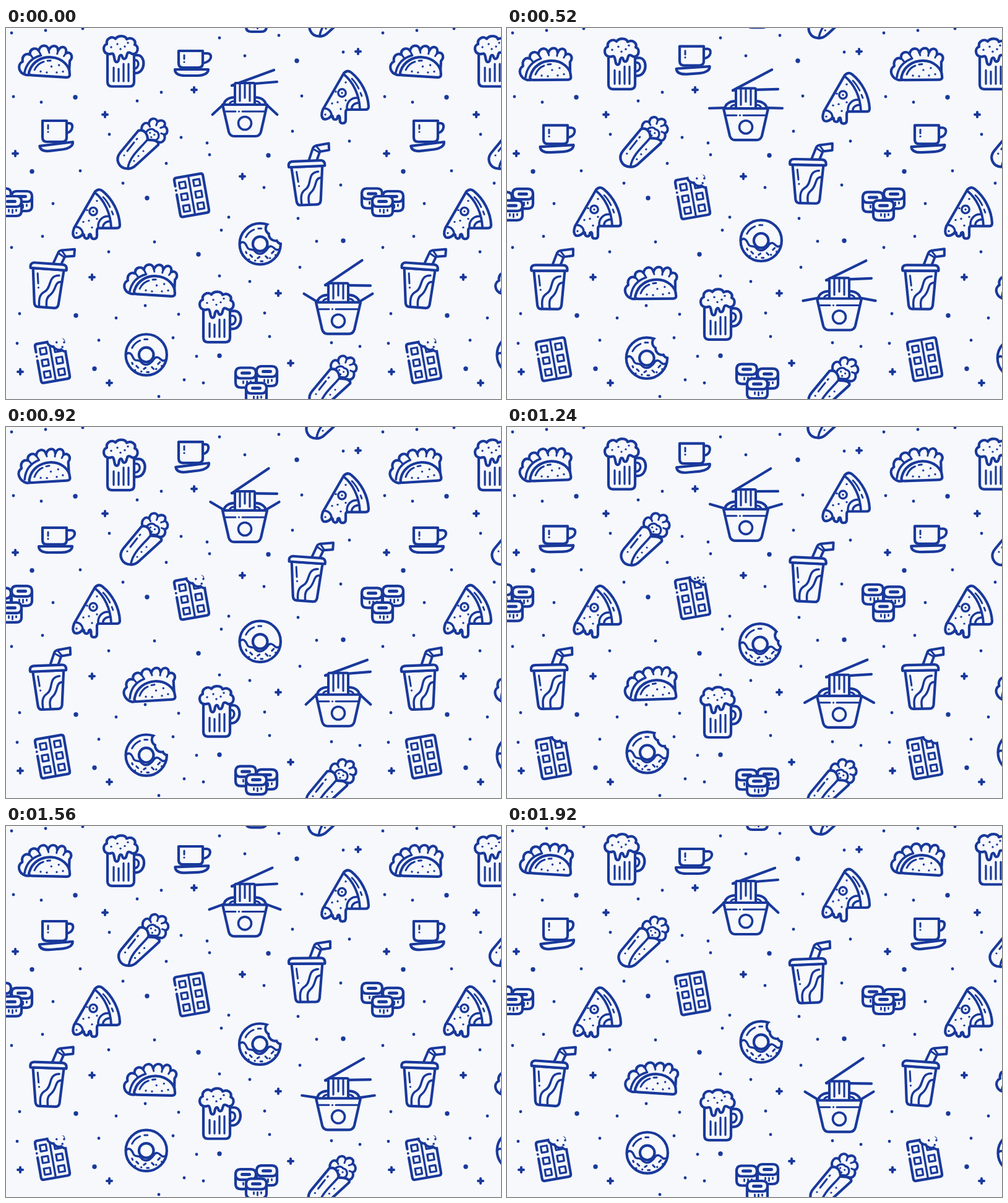
These frames come from a looping animation (800x600 px, 1960 ms). An HTML page with a canvas:

```html
<!DOCTYPE html>
<html lang="en">
<head>
<meta charset="utf-8">
<title>Snack pattern</title>
<style>
  html, body { margin: 0; width: 100%; height: 100%; overflow: hidden; background: #f6f8fc; }
  canvas { display: block; width: 800px; height: 600px; }
</style>
</head>
<body>
<canvas id="stage" width="800" height="600"></canvas>
<script>
const INK = '#19399b', PAPER = '#f6f8fc';
const TILE = 600, STEP = 40, STEPS = 48;
const ctx = document.getElementById('stage').getContext('2d');

// ---------- drawing helpers ----------
function line(d, w = 3) {
  ctx.lineWidth = w;
  ctx.stroke(new Path2D(d));
}
function shape(d, w = 4.2) {
  const path = new Path2D(d);
  ctx.fillStyle = PAPER;
  ctx.fill(path);
  ctx.lineWidth = w;
  ctx.stroke(path);
}
function disc(x, y, r, color = INK) {
  ctx.fillStyle = color;
  ctx.beginPath();
  ctx.arc(x, y, r, 0, 7);
  ctx.fill();
}
function dots(r, xy) {
  for (let i = 0; i < xy.length; i += 2) disc(xy[i], xy[i + 1], r);
}
function ring(x, y, r, w = 4) {
  ctx.lineWidth = w;
  ctx.beginPath();
  ctx.arc(x, y, r, 0, 7);
  ctx.stroke();
}
function at(x, y, draw) {
  ctx.save();
  ctx.translate(x, y);
  draw();
  ctx.restore();
}
function turn(deg, x, y) {
  ctx.translate(x, y);
  ctx.rotate(deg * Math.PI / 180);
  ctx.translate(-x, -y);
}
// Cuts round bites with an inked edge, kept inside the silhouette.
function bite(outline, holes) {
  ctx.save();
  ctx.clip(outline);
  for (const [x, y, r] of holes) ring(x, y, r, 8);
  ctx.restore();
  for (const [x, y, r] of holes) disc(x, y, r, PAPER);
}
const wave = p => Math.sin(2 * Math.PI * p);
const ease = p => (1 - Math.cos(2 * Math.PI * p)) / 2;

// ---------- food ----------
function taco(p) {
  const e = ease(p);
  ctx.translate(0, 10.5 * e);
  turn(3.5 - 7 * e, 68, 70);
  at(0, -3 * e, () => {
    shape(`M38 ${78 + 3 * e}H33C20 76 17 62 26 57C24 48 30 42 37 45C36 34 47 32 51 38C52 27 65 26 67 36
      C70 26 82 26 82 36C86 26 97 28 95 39C103 35 108 44 102 51V70`);
    line('M38 45L42 50M51 38L54 43M67 36L68 40M82 36L81 41M95 39L92 44', 3);
    line('M30 75C32 60 40 50 55 45', 3.6);
  });
  shape('M42 78C38 78 36 76 38 71C42 56 56 47 72 47C90 47 103 60 103 72C104 76 102 78 98 78Z');
  line('M46 69C49 62 54 57 60 55M66 53L71 52.5', 3);
  dots(1.7, [66, 72, 82, 71, 92, 69, 85, 59, 56, 71, 73, 62]);
}

function beer(p) {
  const e = ease(p);
  ctx.translate(0, 7.6 * e);
  at(2.2 * e, 0, () => {
    shape('M206 44H211C227 43 226 73 209 73H206');
    line('M206 52C216 49 217 66 206 66', 3.6);
  });
  shape('M164 40V87Q164 94.5 171 94.5H200Q207 94.5 207 87V40');
  line('M174 64V86M182 66V86M190 58V86M198 58V86', 3.2);
  shape(`M165 42C156 40 156 28 163 26C161 17 172 12 177 17.5C181 11.5 193 11.5 195 18
    C203 14 211 20 208 27C215 29 214 41 206 42C203 43 201 38 197 40C194 43 196 50 191 50
    C187 50 189 43 185 44C181 45 184 55 179 55C174 55 176 45 173 42C171 40 169 43 165 42Z`);
  dots(1.7, [180, 26, 192, 30, 185, 34, 197, 24, 170, 31]);
}

function cup(p) {
  const e = ease(p), top = 37 - 13 * e, base = 64 - 6 * e;
  shape(`M318 ${top + 4}H${326 - 3 * e}Q${332 - 4 * e} ${top + 5} ${331 - 4 * e} ${top + 11}
    Q${329 - 3 * e} ${top + 18} 318 ${top + 20}`, 4);
  shape(`M279 ${top}H318V${base - 7}Q318 ${base} 311 ${base}H286Q279 ${base} 279 ${base - 7}Z`);
  line(`M288 ${top + 7}V${top + 13}`, 3);
  dots(1.6, [288, top + 18]);
  at(1.5 * e, -5.5 * e, () => {
    turn(-7 * e, 300, 70);
    shape('M273 67H327C327 74 318 77 310 77H290C280 77 273 74 273 67Z');
  });
}

function noodles(p) {
  const e = ease(p), y = 11 * e, grip = 93 + 14 * e, top = 89 + 15 * e;
  line(`M365 ${grip}L438 ${87 + 21 * e}`, 4.2);
  line(`M365 ${grip}L${433 - 8.5 * e} ${68 - e}`, 4.2);
  at(0, y, () => {
    shape('M352 124C353 116 361 112 371 112H401C411 112 419 116 420 124');
    line('M361 123Q363 118 370 118M411 123Q409 118 402 118', 3.2);
  });
  shape(`M370 ${123 + y}V${top + 2}Q370 ${top} 372 ${top}H400Q402 ${top} 402 ${top + 2}V${123 + y}`, 4);
  line(`M378 ${top}V${118 + y}M386 ${top}V${113 + y}M394 ${top}V${118 + y}`, 3.2);
  const a = (43 - 74 * e) * Math.PI / 180, fx = 25 * Math.cos(a), fy = 25 * Math.sin(a);
  at(0, y, () => {
    line(`M352 123L${352 - fx} ${123 + fy}M420 123L${420 + fx} ${123 + fy}`, 4.2);
    shape('M350 124H422L412 168Q410 175 403 175H369Q362 175 360 168Z');
    line('M355 135H371M382 135H418', 3);
    dots(1.6, [376.5, 135]);
    ring(386, 154, 10.5, 3.6);
  });
}

function pizza(p) {
  const e = ease(p), drip = 154 - 4.5 * e;
  ctx.translate(0, 5.6 * e);
  shape(`M546 73Q552 67 558 72C574 85 585 106 586 127Q586 132 581 132H552Q549 132 549 136V${drip - 5}
    Q549 ${drip} 544 ${drip}Q539.5 ${drip} 539.5 ${drip - 5}V145Q539 140 536 143
    Q536 ${148 + e} 532 ${148 + e}Q528 148 528 143Q526 140 524 144Q518 149 513 147Q508 143 512 132Z`);
  line('M546 75C561 87 571 108 572 131', 3.8);
  line('M559 82C564 87 567 92 570 98M573 105L575 110', 2.8);
  ring(543, 105, 6.2, 3.4);
  line('M514 130C522 130 527 136 526 144M551 131C550 120 558 112 568 113M559 131C558 126 563 121 570 121', 3.5);
  disc(543, 105, 1.7);
  dots(1.7, [549, 88, 533, 103, 536, 120, 527, 122, 549, 117, 541, 131, 516, 140]);
}

function burrito(p) {
  const e = ease(p), a = 2 * Math.PI * (p + 0.1);
  ctx.translate(5 * e, -5 * e);
  at(-2.3 + 2.5 * Math.cos(a), -1.7 + 2 * Math.sin(a), () => {
    shape(`M220 168C217 157 226 151 231 156C232 145 243 145 245 152C253 147 260 153 256 159
      C263 163 262 172 256 173C259 181 253 187 247 185L230 182Z`, 4);
    line('M231 156L233 160M245 152L243 158M256 160L250 162M256 173L251 171', 3);
    shape('M226 174C226 164 237 161 241 167C249 168 249 180 242 182L230 181Z', 3.4);
    dots(1.6, [233, 170, 240, 173, 235, 177]);
  });
  shape(`M214 166L185 201C175 213 183 227 196 227.5C202 228 207 225 211 221L246 189
    C248 184 241 181 229 181C229 172 224 163 214 166Z`);
  line('M229 180C218 194 200 207 197 226', 3.6);
  line('M196 199L207 185M211 180L212 179', 3);
  dots(1.6, [191, 206, 214, 207, 222, 199, 207, 215]);
}

function soda(p) {
  const e = ease(p);
  ctx.translate(e, -4.5 * e);
  turn(-2.5 + 6.5 * e, 486, 219);
  at(3 * e, e, () => {
    shape('M489 216L497 195Q498 192 502 191L523 188V199L508 201L502 216', 4);
    line('M497 196L507 202M502 191L509 200', 3);
  });
  shape('M461 224L467 280Q468 286 473 286H500Q505 286 506 280L511 224Z');
  line('M504 233C485 234 494 254 482 261C474 266 474 274 475 284', 3.5);
  line('M508 243C496 244 502 257 491 266C486 270 486 276 487 284', 3.5);
  line('M469 232L471 248', 3);
  dots(1.6, [472, 255]);
  shape('M457 224Q455 215 464 215H508Q516 215 515 224Z');
}

const SLAB = new Path2D();
SLAB.roundRect(-25.6, -34.1, 51.2, 68.2, 6);

function waffle(p) {
  const u = p * STEP * STEPS;
  ctx.translate(300, 270.5 + 6 * ease(p));
  turn(-10, 0, 0);
  line('M-23.5 -19V-28Q-23.5 -32 -19.5 -32H19.5Q23.5 -32 23.5 -28V28Q23.5 32 19.5 32H-19.5Q-23.5 32 -23.5 28V-5', 4.2);
  dots(2, [-23.5, -12]);
  line('M0 -29V29', 3.4);
  for (const x of [-11.7, 11.7])
    for (const y of [-18.8, 0.3, 19.4]) line(`M${x - 5} ${y - 5}h10v10h-10z`, 3.2);
  if (u >= 200 && u < 480) bite(SLAB, [[13, -34, 8], [23, -28, 7]]);
  if (u >= 480 && u < 1200) {
    bite(SLAB, [[7, -33, 8], [16, -27, 9], [25, -21, 7]]);
    dots(1.8, [12, -29, 20, -20, 24, -27]);
  }
  if (u >= 1200 && u < 1400) {
    bite(SLAB, [[11, -33, 8], [22, -27, 8]]);
    dots(1.8, [9, -29, 14, -30, 16, -25, 21, -22, 23, -28]);
  }
}

const ROUND = new Path2D();
ROUND.arc(0, 0, 35.3, 0, 7);

function donut(p) {
  const u = p * STEP * STEPS;
  const kick = u > 1120 && u < 1720 ? -2 * (1 - (u - 1120) / 600) : 0;
  ctx.translate(410.7 + kick, 348.3 - 4.5 * wave(p - 0.03));
  ring(0, 0, 33.2, 4.2);
  line('M-32 -1C-27 -6 -23 0 -21 5C-18 12 -13 7 -9 11C-4 18 3 17 8 12C13 9 12 3 18 4C24 5 24 13 32 8', 3.5);
  ctx.fillStyle = PAPER;
  disc(0, 0, 11.5, PAPER);
  ring(0, 0, 11.8, 4.2);
  line('M-23 -11C-20 -17 -15 -21 -10 -23M-3 -25L2 -25', 3);
  line('M-16 18L-13 21M-4 23L-1 21M9 20L12 23M19 15L22 12M1 28L4 28M-23 13L-22 15', 3);
  dots(1.7, [-8, 27, 16, 23, 25, 18, -18, 25]);
  if (u < 240 || u >= 1400) bite(ROUND, [[19, -25, 8], [25, -16, 9], [35, -9, 7]]);
  else if (u < 440) bite(ROUND, [[20, -28, 7], [27, -20, 8], [36, -12, 6]]);
  else if (u >= 1120) bite(ROUND, [[34, -14, 8], [37, -3, 6]]);
}

function roll(x, y) {
  at(x, y + 2, () => {
    shape('M-16.5 8V24Q-16.5 32 -8 32H8Q16.5 32 16.5 24V8Z');
    line('M-4 22V25M2 22V27M8 22V24', 2.8);
    shape('M-8.5 0H8.5Q16.5 0 16.5 8.5T8.5 17H-8.5Q-16.5 17 -16.5 8.5T-8.5 0Z');
    line('M-6 8.5H6', 5);
  });
}
function sushi(p) {
  const e = ease(p);
  roll(591.5, 257.5 + 6 * wave(p));
  roll(625.5, 262 - 7 * e);
  roll(608.5, 270 + 12 * e);
}

// ---------- pattern ----------
// drawing, x shift, y shift, phase
const ITEMS = [
  [taco, 0, 0, 0], [taco, 170, 354, 0],
  [beer, 0, 0, 0], [beer, 155, 406, .5],
  [cup, 0, 0, 0], [cup, -220, 126, .5],
  [noodles, 0, 0, 0], [noodles, 151, 308.7, .5],
  [pizza, 0, 0, 0], [pizza, -402, 186, .5],
  [burrito, 0, 0, 0], [burrito, 305, 391, .5],
  [soda, 0, 0, 0], [soda, -418, 170.5, .5],
  [waffle, 0, 0, 0], [waffle, -225, 262.5, .5],
  [donut, 0, 0, 0], [donut, -184, 181, .5],
  [sushi, 0, 0, 0], [sushi, -204, 290, .5]
];
const SMALL = [
  9, 8, 64, 4, 124, 1, 345, 16, 386, 45, 441, 12, 545, 39, 12, 111, 57, 120, 212, 118,
  251, 104, 167, 172, 283, 177, 325, 186, 329, 205, 259, 219, 120, 231, 189, 251, 417, 258, 463, 167,
  478, 110, 541, 254, 555, 183, 76, 284, 59, 337, 9, 355, 166, 362, 240, 346, 348, 327, 360, 306,
  472, 308, 502, 345, 475, 387, 394, 410, 345, 401, 418, 461, 426, 499, 526, 509, 572, 515, 22, 462,
  178, 469, 225, 449, 279, 463, 270, 501, 150, 505, 18, 510, 308, 531, 288, 569, 319, 574, 247, 596
];
const BIG = [470, 53, 112, 112, 42, 232, 228, 275, 424, 206, 311, 366, 545, 344, 113, 465, 345, 530, 143, 551];
const PLUS = [[569, 38], [304, 100], [160, 140], [15, 203], [382, 240],
  [139, 403], [440, 429], [460, 542], [23, 556], [167, 574]];

function tile(p) {
  dots(2.4, SMALL);
  dots(3.7, BIG);
  for (const [x, y] of PLUS) line(`M${x - 4} ${y}h8M${x} ${y - 4}v8`, 4);
  for (const [draw, x, y, phase] of ITEMS) at(x, y, () => draw((p + phase) % 1));
}

function render(step) {
  ctx.fillStyle = PAPER;
  ctx.fillRect(0, 0, 800, 600);
  ctx.strokeStyle = INK;
  ctx.lineCap = ctx.lineJoin = 'round';
  for (const x of [-TILE, 0, TILE])
    for (const y of [-TILE, 0]) at(x, y, () => tile(step / STEPS));
}

// The last step repeats the first pose, so one loop holds STEPS + 1 steps.
let shown = -1;
function tick() {
  const step = Math.floor(performance.now() / STEP) % (STEPS + 1);
  if (step !== shown) render(shown = step);
  requestAnimationFrame(tick);
}
tick();
</script>
</body>
</html>
```
